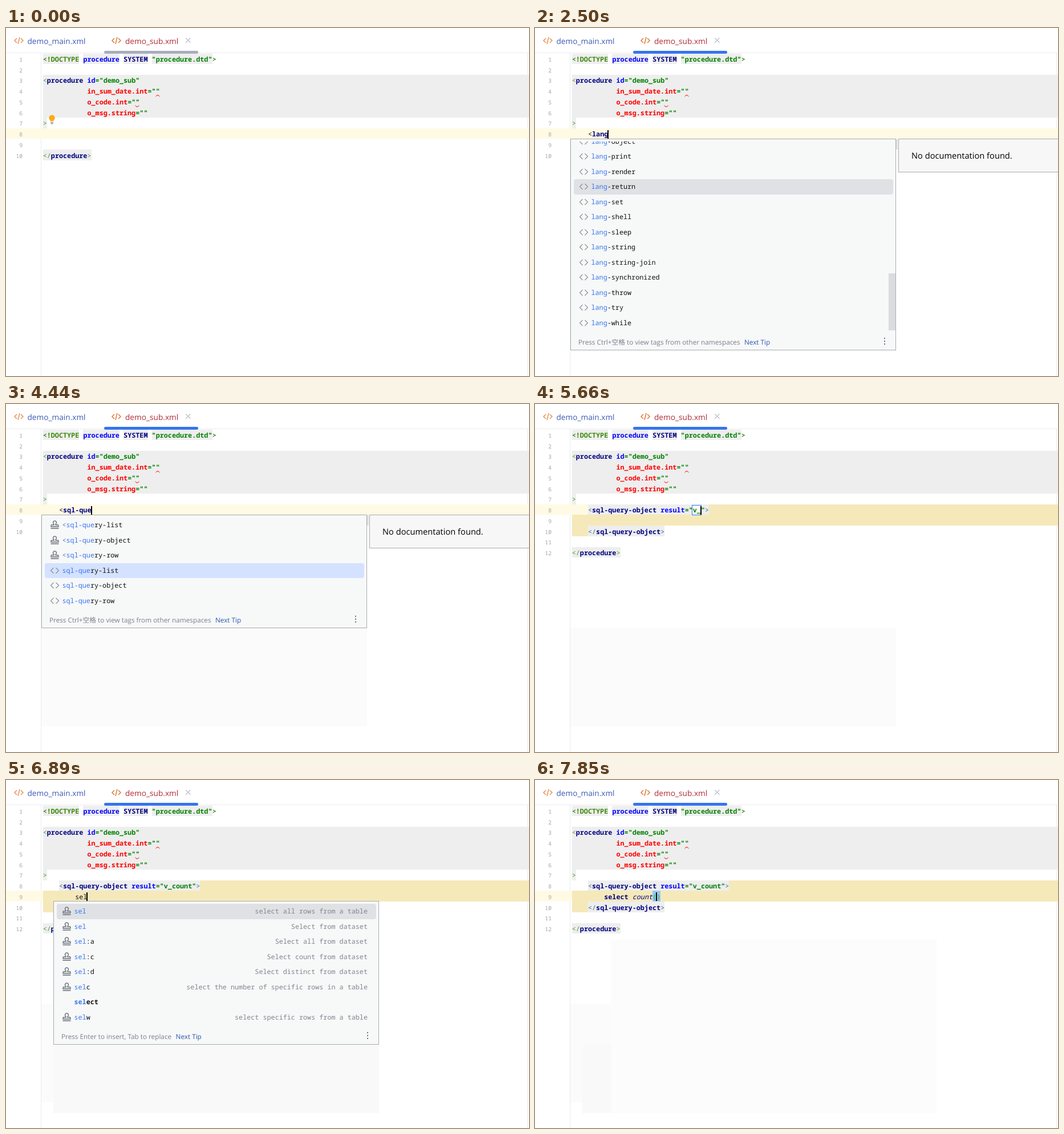
An HTML page for the animation above (8 s loop, 917x610 px).

```html
<!DOCTYPE html>
<html lang="en">
<head>
<meta charset="utf-8">
<title>XML editor</title>
<style>
html, body { margin: 0; width: 100%; height: 100%; overflow: hidden; background: #fff; }
#stage { position: relative; width: 917px; height: 610px; overflow: hidden; text-rendering: geometricPrecision;
  font: 11.78px/19px "Noto Sans Mono", "DejaVu Sans Mono", monospace; color: #111; }
#stage i, #stage b, #stage svg { position: absolute; white-space: pre; }
#stage i { font-style: normal; }
.ui { font-family: "Open Sans", "Noto Sans", "Noto Sans CJK SC", "Noto Sans CJK", sans-serif; }
.tab { font-size: 13.65px; }
.blue { color: #3c5ab4; }
.red { color: #b02a37; }
.none { font-size: 14.65px; color: #000; }
.num { width: 29px; left: 0; text-align: right; font-size: 9.7px; color: #a3a5aa; }
.name { color: #000080; font-weight: bold; }
.attr { color: #0000ff; font-weight: bold; }
.str { color: #008000; font-weight: bold; }
.doc { color: #3b8a08; font-weight: bold; }
.bad { color: #ff0000; font-weight: bold; }
.out { color: #469c23; }
.in { color: #35708c; }
#stage .fn { color: #000080; font-style: italic; }
.pop { position: absolute; box-sizing: border-box; width: 571px; border: 1px solid #a9abb0; background: #f7f8f8; }
.list { position: absolute; left: 0; right: 0; top: 4px; overflow: hidden; }
.row { position: absolute; left: 5px; width: 560px; height: 26.5px; line-height: 27.5px; border-radius: 4px; }
.row i { left: 30.5px; }
.row .desc { left: auto; right: 15px; color: #82858f; }
.row em { font-style: normal; color: #3a78f0; }
.row svg { left: 9px; top: 5px; }
.foot { font-size: 11.75px; bottom: 3px; left: 13px; color: #7b7f8b; }
.foot span { color: #2a56b0; margin-left: 7.5px; }
</style>
</head>
<body>
<div id="stage">
  <div id="view"></div>
  <svg id="mouse" width="9" height="17" fill="none" stroke="#222"><path d="M1 .5h2.5l1 1 1-1H8M4.5 1.5v14M1 16.5h2.5l1-1 1 1H8"/></svg>
</div>
<script>
const X0 = 64.7, CW = 7.07, ROW = 26.5, LOOP = 8000;
const view = document.getElementById('view');
const mouse = document.getElementById('mouse');

const esc = s => s.replace(/&/g, '&amp;').replace(/</g, '&lt;');
const colX = c => X0 + c * CW;
const rowY = n => 45 + 18.74 * (n - 1);
const lineY = n => Math.floor(rowY(n));
const textY = n => Math.round(rowY(n)) + 1;
const rect = (x, y, w, h, color, more = '') =>
  `<b style="left:${x}px;top:${y}px;width:${w}px;height:${h}px;background:${color};${more}"></b>`;
const band = (n, x, right, color) => rect(x, lineY(n), right - x, lineY(n + 1) - lineY(n), color);
const text = (x, y, cls, s) => `<i class="${cls}" style="left:${x}px;top:${y}px">${esc(s)}</i>`;

// Value of the last step that has begun
const at = (t, steps) => steps.reduce((v, [k, x]) => t >= k ? x : v, steps[0][1]);
const within = (t, a, b) => t >= a && t < b;
// One more character of the word at each time
const keys = (base, word, ...times) => times.map((k, i) => [k, base + word.slice(0, i + 1)]);

// Segments are [text, class]; shade paints behind each visible one
function code(n, col, segs, shade) {
  let back = '', front = '';
  for (const [s, cls] of segs) {
    if (shade && s.trim()) back += band(n, colX(col), colX(col + s.length), shade);
    front += text(colX(col), textY(n), cls, s);
    col += s.length;
  }
  return back + front;
}

const angle = (x, color) => `<svg style="left:${x}px;top:15px" width="18" height="14" fill="none" stroke="${color}" stroke-width="1.4"><path d="M5 3L1 7l4 4M12 3l4 4-4 4M10 1L7 13"/></svg>`;
const bulb = n => `<svg style="left:75px;top:${lineY(n) - 5}px" width="12" height="18"><path d="M5.5 .5a5.2 5.2 0 0 1 3 9.4V11.5h-6V9.9a5.2 5.2 0 0 1 3-9.4" fill="#fbab14"/><path d="M3 13.5h5M3.5 15.6h4" stroke="#6c707e" stroke-width="1.2"/></svg>`;
const tagIcon = '<svg width="18" height="16" fill="none" stroke="#8a8d97" stroke-width="1.1"><path d="M6.5 3L1.5 8l5 5M10.5 3l5 5-5 5"/></svg>';
const stampIcon = '<svg width="18" height="16" fill="none" stroke="#646873" stroke-width="1.3"><path d="M7 8V6.5a3 3 0 1 1 3 0V8H14a1 1 0 0 1 1 1v2H2V9a1 1 0 0 1 1-1zM1.5 14h14"/></svg>';
const squiggle = (x, y, d) => `<svg style="left:${x}px;top:${y}px" width="8" height="4" fill="none" stroke="#f00"><path d="${d}"/></svg>`;

const tagTip = 'Press Ctrl+空格 to view tags from other namespaces';
const insTip = 'Press Enter to insert, Tab to replace';
const prefixed = (p, s) => s.split(' ').map(w => p + w);
const langTail = prefixed('lang-', 'render return set shell sleep string string-join synchronized throw try while');
const allTags = [...langTail, 'procedure-call', 'script-include'];
const langTags = ['lang-object', 'lang-print', ...langTail];
const sqlTags = prefixed('sql-', 'cursor etl query-list query-object query-row scope script trans-begin trans-commit trans-none trans-rollback transactional update');
const queries = prefixed('sql-query-', 'list object row');
const queryTags = [...queries.map(q => '*<' + q), ...queries];
const selRows = ['*sel|select all rows from a table', '*sel|Select from dataset', '*sel:a|Select all from dataset',
  '*sel:c|Select count from dataset', '*sel:d|Select distinct from dataset',
  '*selc|select the number of specific rows in a table', '!select', '*selw|select specific rows from a table'];
const sRows = [...selRows, ...prefixed('!', 'set show start savepoint schema')];
const cRows = prefixed('!', 'call case cast ceil char coalesce comment commit concat cos count create current_date');
const coRows = prefixed('!', 'coalesce concat cos count');

// Row marks: * template, ! keyword, none tag
function row(s, i, p) {
  const mark = '*!'.includes(s[0]) ? s[0] : '';
  const [name, desc = ''] = s.slice(mark.length).split('|');
  const hit = p.hit.length + (name[0] === '<' ? 1 : 0);
  const n = name.replace('<', '').startsWith(p.hit) ? hit : 0;
  const fill = i === p.sel ? (p.live ? '#d4e2ff' : '#dfe1e5') : 'none';
  const icon = mark === '*' ? stampIcon : mark ? '' : tagIcon;
  return `<div class="row" style="top:${(i - (p.shift || 0)) * ROW}px;background:${fill}">${icon}` +
    `<i${mark === '!' ? ' style="font-weight:bold"' : ''}><em>${esc(name.slice(0, n))}</em>${esc(name.slice(n))}</i>` +
    `<i class="desc">${desc}</i></div>`;
}

function popup(p) {
  const h = Math.min(p.rows.length, 12.5) * ROW;
  const [top, size] = p.thumb || [0, 0];
  const dots = [0, 5, 10].map(d => rect(549, Math.round(h + 17 + d), 2, 2, '#6c707e')).join('');
  return `<div class="pop" style="left:${p.x}px;top:${p.y}px;height:${h + 39.5}px">` +
    `<div class="list" style="height:${h}px">${p.rows.map((s, i) => row(s, i, p)).join('')}` +
    `${rect(557, top, 12, size, '#dbdcdd')}</div>` +
    `<i class="ui foot">${p.tip}<span>Next Tip</span></i>${dots}</div>`;
}

const typedSteps = [[0, ''], [1270, '<'], ...keys('<', 'lang-', 1600, 1680, 1760, 1840, 1920),
  [2500, '<lang'], [2560, '<lan'], [2620, '<la'], [2680, '<l'], [2740, '<'],
  ...keys('<', 'sql-', 2940, 3060, 3180, 3300), ...keys('<sql-', 'que', 3710, 3800, 3890)];
const valueSteps = [[0, ''], ...keys('', 'v', 5420), ...keys('v', '_count', 5660, 5760, 5920, 5980, 6060, 6120)];
const bodySteps = [[0, ''], ...keys('', 'select ', 6630, 6750, 6890, 6930, 6990, 7070, 7150),
  ...keys('select ', 'count', 7250, 7430, 7490, 7550, 7610)];

function tagPopup(t, typed) {
  const hit = typed.slice(1);
  const p = { x: 62, y: 194, hit, tip: tagTip };
  if (hit.startsWith('l')) return { ...p, rows: langTags, sel: 3, shift: .5, thumb: [231, 100] };
  if (hit.length > 4) return { ...p, rows: queryTags, sel: within(t, 4440, 4600) ? 3 : 4, live: t >= 4380 };
  if (hit) return { ...p, rows: sqlTags, sel: 3, shift: .5, thumb: [144, 187] };
  return { ...p, rows: allTags, sel: 1, thumb: [260, 35] };
}

function bodyPopup(t, body) {
  const word = body.slice(7);
  if (within(t, 6690, 7150)) {
    const rows = body.length < 3 ? sRows : body.length < 4 ? selRows : ['!select'];
    return { x: 83, y: 212, hit: body, tip: insTip, sel: 0, rows };
  }
  if (within(t, 7310, 7790)) {
    const rows = word.length < 2 ? cRows : word.length < 3 ? coRows : ['!count'];
    return { x: 133, y: 212, hit: word, tip: insTip, sel: 0, rows };
  }
}

function draw(t) {
  const tagged = t >= 4720;
  const line = within(t, 540, 740) || t >= 6220 ? 9 : 8;
  const last = tagged ? 12 : 10;
  const typed = at(t, typedSteps), value = at(t, valueSteps), body = at(t, bodySteps);
  const grey = '#eeeeee', tan = '#f5e9ba';
  let col = t < 840 ? 0 : 4 + typed.length;
  let h = '';

  // Faint areas left behind by closed lists
  if (t >= 3710) h += rect(62, 392, 571, 173, '#fbfbfb');
  if (t >= 6890) h += rect(83, 464, 571, 120, '#f9f9f9');
  if (t >= 7430) h += rect(133, 279, 571, 305, '#fcfcfc');

  h += rect(61, 44, 1, 566, '#ebecf0') + rect(914, 44, 1, 566, '#ebecf0');
  h += band(line, 0, 917, '#fffae3');
  for (let n = 3; n < 7; n++) h += band(n, 65, 917, grey);
  if (t >= 4900) {
    h += band(8, colX(32 + value.length), 917, tan);
    h += band(9, 65, 917, tan) + band(10, 65, 93, tan);
  }

  // Tabs
  h += rect(0, 43, 917, 1, '#ebecf0');
  h += angle(14, '#e68a4c') + text(37.5, 13, 'ui tab blue', 'demo_main.xml');
  h += angle(185, '#dd7128') + text(209, 13, 'ui tab red', 'demo_sub.xml');
  h += '<svg style="left:314px;top:16px" width="11" height="11" stroke="#8b8f9c"><path d="M1.5 1.5l8 8M9.5 1.5l-8 8"/></svg>';
  h += rect(172, 40, 165, 5, t < 540 ? '#a8adbd' : '#3574f0', 'border-radius:2.5px');

  // Code
  for (let n = 1; n <= last; n++) h += `<i class="num" style="top:${textY(n)}px">${n}</i>`;
  h += code(1, 0, [['<!DOCTYPE', 'doc'], [' ', ''], ['procedure', 'attr'], [' ', ''], ['SYSTEM', 'name'], [' ', ''], ['"procedure.dtd"', 'str']], grey);
  h += code(1, 42, [['>', 'doc']]);
  h += code(3, 0, [['<', 'out'], ['procedure', 'name'], [' ', ''], ['id', 'attr'], ['="demo_sub"', 'str']]);
  ['in_sum_date.int', 'o_code.int', 'o_msg.string'].forEach((a, i) => {
    h += code(4 + i, 11, [[a, 'bad'], ['=""', 'str']]);
  });
  h += squiggle(262, 117, 'M.5 3L3 .8 5 .8 7.5 3') + squiggle(226, 135, 'M.5 .8L3 3 5 3 7.5 .8');
  h += code(7, 0, [['>', 'out']], grey);
  h += code(last, 0, [['</', 'out'], ['procedure', 'name'], ['>', 'out']], grey);

  if (tagged) {
    h += code(8, 4, [['<', 'in'], ['sql-query-object', 'name'], [' result', 'attr'], [`="${value}"`, 'str'], ['>', 'in']], grey);
    h += code(10, 4, [['</', 'in'], ['sql-query-object', 'name'], ['>', 'in']], grey);
    if (line === 8) {
      col = 30 + value.length;
      h += rect(colX(30) - 1.5, 177, value.length * CW + 3, 18, '#fff', 'box-sizing:border-box;border:1.5px solid #3574f0');
      h += code(8, 30, [[value, 'str']]);
    } else {
      const done = body.length >= 6, called = t >= 7790;
      col = 8 + body.length + (called ? 1 : 0);
      if (t >= 7850) h += band(9, colX(20), colX(22), '#93cbf3');
      h += code(9, 8, [[body.slice(0, 6), done ? 'name' : ''], [body.slice(6), called ? 'fn' : ''], [called ? '()' : '', 'out']]);
    }
  } else {
    h += code(8, 4, [[typed.slice(0, 1), ''], [typed.slice(1), 'name']]);
  }

  if (t < 540 || within(t, 1130, 1270)) h += bulb(7);
  if (within(t, 6470, 6630)) h += bulb(8);

  const off = t < 540 || within(t, 2250, 2500) || within(t, 4220, 4380) || within(t, 5170, 5420);
  if (!off) h += rect(Math.round(colX(col)) - 1, lineY(line) + 3, 2, 15, '#000');

  // Lists and documentation
  const p = within(t, 1330, 4720) ? tagPopup(t, typed) : bodyPopup(t, body);
  if (within(t, 1920, 4720)) {
    h += rect(633, 195, 3, 18, '#dedfe1');
    h += rect(637, 194, 300, 59, '#f7f7f7', 'box-sizing:border-box;border:1px solid #a9abb0');
    h += text(660, 215, 'ui none', 'No documentation found.');
  }
  if (p) h += popup(p);
  return h;
}

let shown = '';
const begin = performance.now();
function tick() {
  const t = Math.max(0, performance.now() - begin) % LOOP;
  const html = draw(t);
  if (html !== shown) view.innerHTML = shown = html;

  const k = Math.min(1, Math.max(0, (t - 40) / 360));
  const e = k * k * (3 - 2 * k);
  mouse.style.visibility = within(t, 40, 740) ? 'visible' : 'hidden';
  mouse.style.left = 336 - 155 * e + 'px';
  mouse.style.top = 498 - 310 * e + 'px';
  requestAnimationFrame(tick);
}
tick();
</script>
</body>
</html>
```
